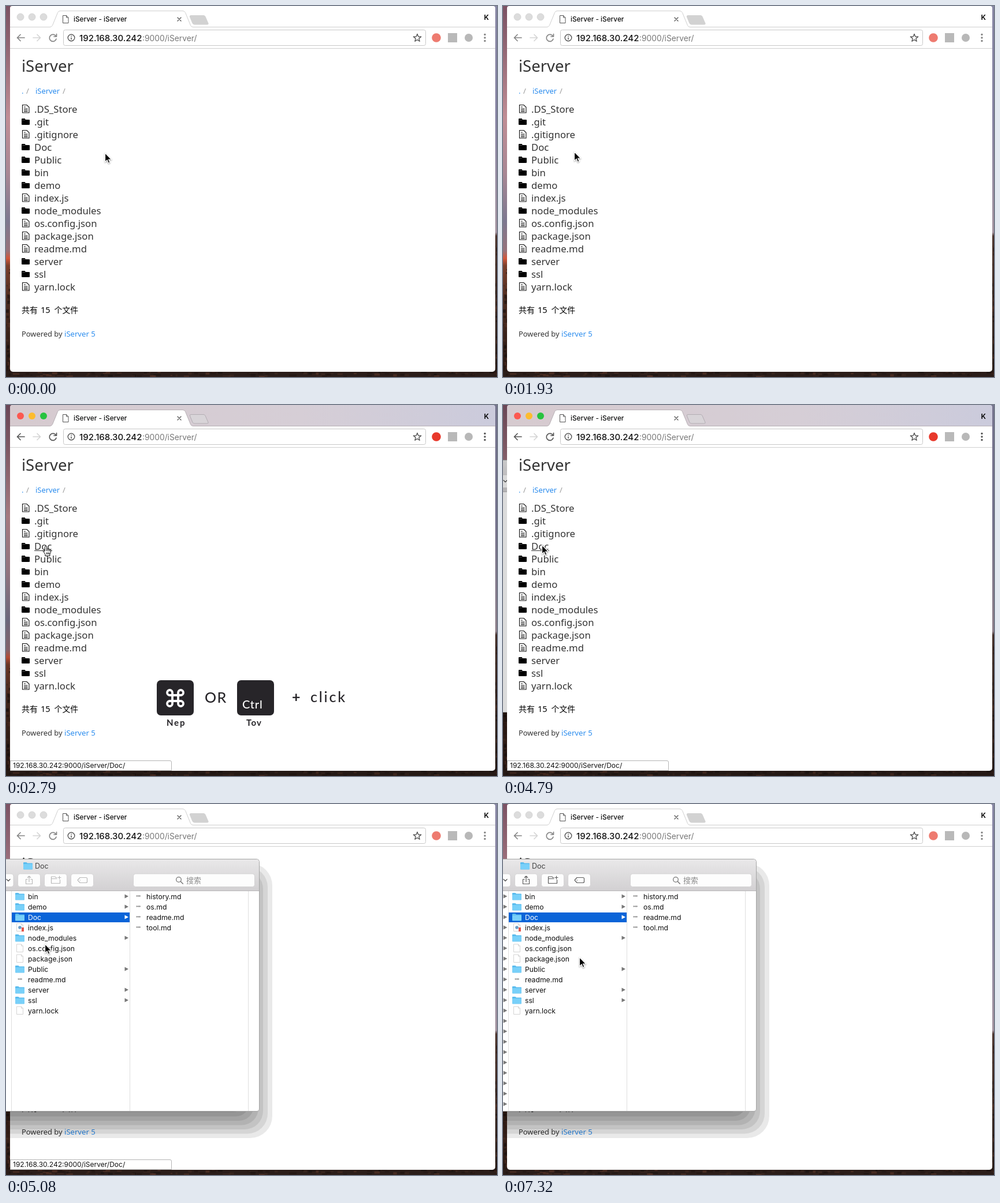
An HTML page that plays this animation: 850 px wide and 643 px high, repeating every 8000 ms.

```html
<!DOCTYPE html>
<html lang="en">
<head>
<meta charset="utf-8">
<title>File list</title>
<style>
html, body { margin: 0; width: 100%; height: 100%; overflow: hidden; background: #fff; }
svg { display: block; width: 850px; height: 643px; }
text { white-space: pre; }
.page { font-family: "Noto Sans", "Noto Sans CJK SC", sans-serif; fill: #333; }
.ui { font-family: Inter, "Noto Sans CJK SC", sans-serif; }
.keys { font-family: Lato, sans-serif; font-weight: 500; fill: #272529; }
.link { fill: #2a8cee; }
.line { fill: none; stroke-linecap: round; stroke-linejoin: round; }

#browser { --icon: #858585; --bar: #fff; --edge: #cfcfcf; --plus: #d2d2d2; --plusEdge: #d2d2d2;
  --red: #dcdcdc; --amber: #dcdcdc; --green: #dcdcdc; --lampEdge: #c9c9c9; --block: #ee7b70; }
#browser.active { --icon: #555; --bar: url(#barFill); --edge: #b7b0b5; --plus: #d8d4d8; --plusEdge: #b3adb3;
  --red: #fc5850; --amber: #fdbc2e; --green: #27c33f; --lampEdge: none; --block: #e8382b; }
#finder { --tool: #b9b9b9; }
#finder.ready { --tool: #5c5c5c; }
</style>
</head>
<body>
<svg id="stage" viewBox="0 0 850 643" xmlns="http://www.w3.org/2000/svg"></svg>
<script>
const LOOP = 8000;
const stage = document.getElementById('stage');
const $ = id => document.getElementById(id);

const rect = (x, y, w, h, fill, more = '') =>
  `<rect x="${x}" y="${y}" width="${w}" height="${h}" fill="${fill}" ${more}/>`;
const path = (d, more = '') => `<path d="${d}" ${more}/>`;
const circle = (x, y, r, fill, more = '') => `<circle cx="${x}" cy="${y}" r="${r}" fill="${fill}" ${more}/>`;
const text = (x, y, size, str, more = '') => `<text x="${x}" y="${y}" font-size="${size}" ${more}>${str}</text>`;
const group = (id, body, more = '') => `<g id="${id}" ${more}>${body}</g>`;
const times = (n, fn) => Array.from({ length: n }, (_, i) => fn(i)).join('');
const gradient = (id, stops, dir = 'x2="0" y2="1"') =>
  `<linearGradient id="${id}" ${dir}>` +
  stops.map(([at, c]) => `<stop offset="${at}" stop-color="${c}"/>`).join('') + '</linearGradient>';

function random(seed) {
  return () => (seed = (seed * 16807) % 2147483647) / 2147483647;
}

function desktop() {
  const rnd = random(41);
  const tones = ['#20130f', '#5a3527', '#402820', '#17100e'];
  const speck = (x, y, w, h) => rect(x, y, w, h, tones[rnd() * 4 | 0], 'opacity=".6"');
  return rect(0, 0, 425, 643, 'url(#skyLeft)') + rect(425, 0, 425, 643, 'url(#skyRight)') +
    rect(0, 633, 850, 10, '#2b1d19') +
    times(45, () => speck(rnd() * 6, 455 + rnd() * 180, 2 + rnd() * 3, 2 + rnd() * 5)) +
    times(30, () => speck(846 + rnd() * 3, 410 + rnd() * 220, 2, 2 + rnd() * 6)) +
    times(110, () => speck(rnd() * 850, 633 + rnd() * 8, 3 + rnd() * 10, 1 + rnd() * 3));
}

const files = ['.DS_Store', '.git/', '.gitignore', 'Doc/', 'Public/', 'bin/', 'demo/', 'index.js',
  'node_modules/', 'os.config.json', 'package.json', 'readme.md', 'server/', 'ssl/', 'yarn.lock'];

function fileRow(name, i) {
  const y = 179 + 22 * i;
  const icon = name.endsWith('/')
    ? path(`M27 ${y - 5}q0-1 1-1h4.6l1.4 2h6q1 0 1 1v7q0 1-1 1h-12q-1 0-1-1z`, 'fill="#000"') +
      path(`M28 ${y - 3.5}h5.6`, 'stroke="#777" stroke-width=".6"')
    : path(`M28.5 ${y - 7.5}h7.5l4 4v9.500h-11.500zM31 ${y - 4}h3M31 ${y - 1}h6.500M31 ${y + 1.3}h6.500M31 ${y + 3.6}h6.500`,
      'fill="none" stroke="#111" stroke-width="1.1"');
  return icon + text(49, y + 6, 16.7, name.replace('/', ''));
}

function browser() {
  const stroke = 'class="line" stroke="var(--icon)" stroke-width="1.7"';
  const lamps = ['red', 'amber', 'green'].map((c, i) =>
    circle(25 + 20 * i, 19, 6, `var(--${c})`, 'stroke="var(--lampEdge)" stroke-width=".6"')).join('');
  const star = times(10, i => {
    const r = i % 2 ? 3 : 7, a = (i / 5 - .5) * Math.PI;
    return `${i ? 'L' : 'M'}${(712 + r * Math.cos(a)).toFixed(1)} ${(55.5 + r * Math.sin(a)).toFixed(1)}`;
  });
  const tab = 'M7 36.5H76Q79 36.5 80.5 33.5L89.5 11.5Q90.5 8.5 94 8.5H306Q309 8.5 310.5 11.5L319.5 33.5Q320.5 36.5 324 36.5H847';
  const chrome =
    rect(7, 0, 840, 634, '#fff', 'rx="5"') +
    path('M7 36V4Q7 0 11 0H843Q847 0 847 4V36Z', 'fill="var(--bar)"') + lamps +
    path(tab + 'V38H7Z', 'fill="#fff"') + path(tab, 'fill="none" stroke="var(--edge)"') +
    path('M320 16.5h22q2 0 3 2l5 11.5q.8 2-1.5 2h-22q-2.5 0-3.5-2l-4.5-11q-1-2.5 1.5-2.5z',
      'fill="var(--plus)" stroke="var(--plusEdge)"') +
    path('M98.5 16.5h6l3.5 3.5v9.5h-9.5zM104.5 16.5v3.5h3.5', 'fill="#fff" stroke="#555"') +
    text(117, 27, 11.8, 'iServer - iServer', 'font-weight="500" fill="#111"') +
    path('M297 20l6 6M303 20l-6 6', 'class="line" stroke="#555" stroke-width="1.3"') +
    text(827.5, 24, 12, 'K', 'font-weight="600"') +
    path('M32 55H19.5M25 49.5L19.5 55l5.5 5.5', stroke) +
    path('M47 55H59.5M54 49.5L59.5 55l-5.5 5.5', 'class="line" stroke="#d5d5d5" stroke-width="1.7"') +
    path('M86.5 52.5A6 6 0 1 0 87 57M87.5 48.5V53H83', stroke) +
    rect(99.5, 41.5, 627, 27, '#fff', 'rx="3" stroke="#c8c8c8"') +
    circle(113, 55, 5.8, 'none', 'stroke="#555" stroke-width="1.4"') +
    path('M113 54.5v3.7M113 51.5v1.4', 'stroke="#555" stroke-width="1.5"') +
    text(127, 60.5, 15, '192.168.30.242', 'font-weight="500" fill="#111"') +
    text(236, 60.5, 13.8, ':9000/iServer/', 'fill="#777"') +
    path(star + 'Z', 'class="line" stroke="#555" stroke-width="1.4"') +
    circle(745, 55, 7.8, 'var(--block)') + rect(765, 47, 16, 16, '#b9b9b9') + circle(801, 55, 7, '#b8b8b8') +
    times(3, i => circle(829, 49.5 + 5.5 * i, 1.7, 'var(--icon)')) +
    rect(7, 73, 840, 1, '#cfcfcf');
  const page =
    text(27, 114, 27.5, 'iServer') +
    text(27, 152, 13, '.', 'class="link"') + text(35, 152, 13, '/', 'fill="#999"') +
    text(51, 152, 12.9, 'iServer', 'class="link"') + text(98, 152, 13, '/', 'fill="#999"') +
    files.map(fileRow).join('') + rect(49, 252, 31, 1, '#333', 'id="under"') +
    text(27, 532, 14, '共有', 'fill="#000"') + text(60, 532, 14.5, '15', 'fill="#000"') +
    text(83.5, 532, 13.9, '个文件', 'fill="#000"') +
    text(27, 573, 12.9, 'Powered by') + text(101, 573, 13.1, 'iServer 5', 'class="link"');
  const status = path('M7.5 633.5V616.5H284Q286.5 616.5 286.5 619V633.5Z', 'fill="#fff" stroke="#b4b4b4"') +
    text(12, 629, 12, '192.168.30.242:9000/iServer/Doc/', 'fill="#111"');
  return group('browser', `<g class="ui">${chrome}</g><g class="page">${page}</g>` +
    group('status', status, 'class="ui"'));
}

function shortcut() {
  const loops = times(4, i => path('M-5-5H-9.5a4.5 4.5 0 1 1 4.5-4.5z', `transform="rotate(${90 * i})"`));
  return group('keys',
    rect(261, 477, 64, 61, '#272529', 'rx="7"') + rect(400, 477, 64, 61, '#272529', 'rx="7"') +
    `<g transform="translate(293 508)" fill="none" stroke="#fff" stroke-width="3.8">${path('M-5-5H5V5H-5z')}${loops}</g>` +
    text(409, 526, 20, 'Ctrl', 'fill="#fff" letter-spacing=".8"') +
    text(344, 516, 25, 'OR', 'letter-spacing="1.5"') +
    text(495, 515, 25, '+', 'font-weight="700"') + text(527, 515, 25, 'click', 'letter-spacing="2.8"') +
    text(278, 556, 15, 'Nep', 'letter-spacing="1.8" font-weight="700"') +
    text(416, 556, 15, 'Tov', 'letter-spacing="1.2" font-weight="700"'), 'class="keys"');
}

const folder = (x, y) => path(`M${x} ${y + 1}q0-1 1-1h4.5l1.5 1.5h8q1 0 1 1v9q0 1-1 1h-14q-1 0-1-1z`, 'fill="#5bbcee"') +
  rect(x, y + 3, 16, 9, '#78d0f9', 'rx="1"');
const triangle = (x, y, fill = '#777') => path(`M${x} ${y - 3.5}l6.5 3.5l-6.5 3.5z`, `fill="${fill}"`);
const sheet = y => path(`M18.5 ${y - 7}h8l3 3v10.5h-11zM26.5 ${y - 7}v3h3`, 'fill="#fff" stroke="#c9c9c9" stroke-width=".8"');
const marks = (x, y) => text(x, y + 3.5, 7, '***', 'fill="#666" letter-spacing="-1"');

const entries = ['bin/', 'demo/', 'Doc/', 'index.js', 'node_modules/', 'os.config.json', 'package.json',
  'Public/', 'readme.md', 'server/', 'ssl/', 'yarn.lock'];

function entry(name, i) {
  const y = 160 + 18 * i, picked = name === 'Doc/';
  const dir = name.endsWith('/');
  let icon = dir ? folder(16, y - 6) : name.endsWith('.md') ? marks(20, y) : sheet(y);
  if (name === 'index.js') icon += circle(24, y, 2.8, '#6b9cc4') + rect(27, y, 4, 7, '#e5574b');
  return (picked ? rect(10, 188, 204, 17, '#0a64d8') : '') + icon +
    text(38, y + 5, 12.2, name.replace('/', ''), picked ? 'fill="#fff"' : '') +
    (dir ? triangle(205.5, y, picked ? '#fff' : '#777') : '');
}

function finder() {
  const shadow = times(7, i => rect(-60, 103 + 6 * i, 521 - 8 * i, 476 - 13.5 * i, '#000', `opacity=".085" rx="${38 - 3 * i}"`));
  const button = (x, w) => rect(x, 121, w, 22.5, '#fdfdfd', 'rx="4" stroke="#cfcdcf" stroke-width=".8"');
  const tool = 'class="line" stroke="var(--tool)" stroke-width="1.2"';
  const body =
    path('M-2 95.5H433Q438.5 95.5 438.5 101V528Q438.5 532.5 434 532.5H-2Z', 'fill="#fff" stroke="#a5a5a5"') +
    path('M-2 96H433Q438 96 438 101V150H-2Z', 'fill="url(#toolFill)"') + rect(-2, 150, 440, 1, '#b7b5b7') +
    folder(30, 101) + text(50, 112, 12.5, 'Doc', 'fill="#444"') +
    button(-12, 25) + button(20.5, 39) + button(66.5, 39) + button(112.5, 39) + button(220.5, 210) +
    path('M1 130.5l3 3l3-3', 'class="line" stroke="#555" stroke-width="1.3"') +
    path('M37 130.5h-2.5v8h11v-8H43M40 135v-10M37.3 127.5L40 124.8l2.7 2.7', tool) +
    path('M88 127.5H86l-1-1.5h-6.5v11.5h15v-6M78.5 129.5H88M92.5 125v5M90 127.5h5', tool) +
    path('M128 127.5h10.5q2 0 2 2v5q0 2-2 2H128l-4-4.5zM128 132h.6', tool) +
    circle(299, 131, 4.3, 'none', 'stroke="#777" stroke-width="1.3"') +
    path('M302.3 134.3l4 4', 'class="line" stroke="#777" stroke-width="1.5"') +
    text(312, 137, 13, '搜索', 'fill="#8b8b8b"') +
    [9, 214, 419].map(x => rect(x, 151, 1, 381, '#dedede')).join('') +
    entries.map(entry).join('') +
    ['history.md', 'os.md', 'readme.md', 'tool.md'].map((n, i) =>
      marks(225, 160 + 18 * i) + text(243, 165 + 18 * i, 12.2, n)).join('') +
    group('tree', times(21, i => triangle(.8, 160 + 18 * i)));
  return group('finder', shadow + body, 'class="ui" fill="#111"');
}

stage.innerHTML = '<defs>' +
  gradient('skyLeft', [[0, '#7c5264'], [.1, '#8f6472'], [.3, '#c08d95'], [.45, '#a98794'], [.58, '#7d7890'],
    [.66, '#98727a'], [.68, '#d2573c'], [.7, '#7a3f2c'], [.8, '#4a2b20'], [1, '#241612']]) +
  gradient('skyRight', [[0, '#8887a5'], [.3, '#8582a2'], [.61, '#a3939f'], [.62, '#4b332c'], [1, '#231814']]) +
  gradient('barFill', [[0, '#d6cacf'], [.6, '#d6ced6'], [1, '#cbcbdc']], 'x2="1" y2="0"') +
  gradient('toolFill', [[0, '#e9e8e9'], [1, '#d2d0d2']]) + finder() + '</defs>' +
  desktop() + '<use id="behind" href="#finder"/>' + group('shade', rect(0, 0, 850, 643, '#000', 'opacity=".14"')) +
  browser() + shortcut() + '<use id="front" href="#finder"/>' +
  group('arrow', path('M.5.8V16.3l3.6-3.4 2.4 5.5 2.5-1.1-2.3-5.3H11.6z',
    'stroke="#fff" stroke-width="1.2" style="filter:drop-shadow(0 1px 1px #0006)"')) +
  group('hand', path('M3.5 10L1.8 8.2Q.4 7.3.5 8.8L4.4 14.8V17.5H12.4V14.8Q14.4 12 14 7.8Q13.4 6 12 6.9' +
    'Q11 5.2 9.4 6.1Q8.6 4.8 7 5.6V1.8Q6.6.3 5.2.5Q3.9.7 3.9 2.2V9M7 6v3M9.5 6.5v3M12 7v2.5M7 11.5v3.5M9.2 11.5v3.5M11.2 11.5v3.5',
    'fill="#fff" stroke="#000" stroke-linejoin="round"'), 'transform="translate(63.5 244)"');

// Pointer tip: start time, x, y
const moves = [
  [0, 171, 254], [150, 167, 258], [300, 152, 261], [450, 122, 259], [600, 90, 251], [750, 66, 243], [880, 56, 240],
  [1030, 58, 240], [1630, 72, 245], [1780, 104, 252], [1930, 123, 252], [2340, 112, 252], [2490, 86, 249],
  [2640, 67, 245], [4790, 67, 242], [6570, 64, 218], [6720, 92, 163], [6870, 138, 182], [7020, 154, 243],
  [7170, 143, 287], [7320, 132, 265]
];

const show = (id, on) => { $(id).style.display = on ? '' : 'none'; };
const within = (t, from, to) => t >= from && t < to;

function draw(t) {
  const [, x, y] = moves.filter(m => m[0] <= t).pop();
  const hand = within(t, 2790, 4790);
  const active = within(t, 2190, 5080);
  $('arrow').setAttribute('transform', `translate(${x} ${y})`);
  show('arrow', !hand);
  show('hand', hand);
  show('keys', hand);
  show('status', within(t, 2790, 5380));
  show('under', within(t, 2790, 5380));
  show('behind', within(t, 4790, 4940));
  show('front', t >= 4940);
  show('tree', t >= 5980);
  show('shade', active);
  $('browser').classList.toggle('active', active);
  $('finder').classList.toggle('ready', t >= 5830);
}

const start = performance.now();
function tick() {
  draw((performance.now() - start) % LOOP);
  requestAnimationFrame(tick);
}
draw(0);
requestAnimationFrame(tick);
</script>
</body>
</html>
```
